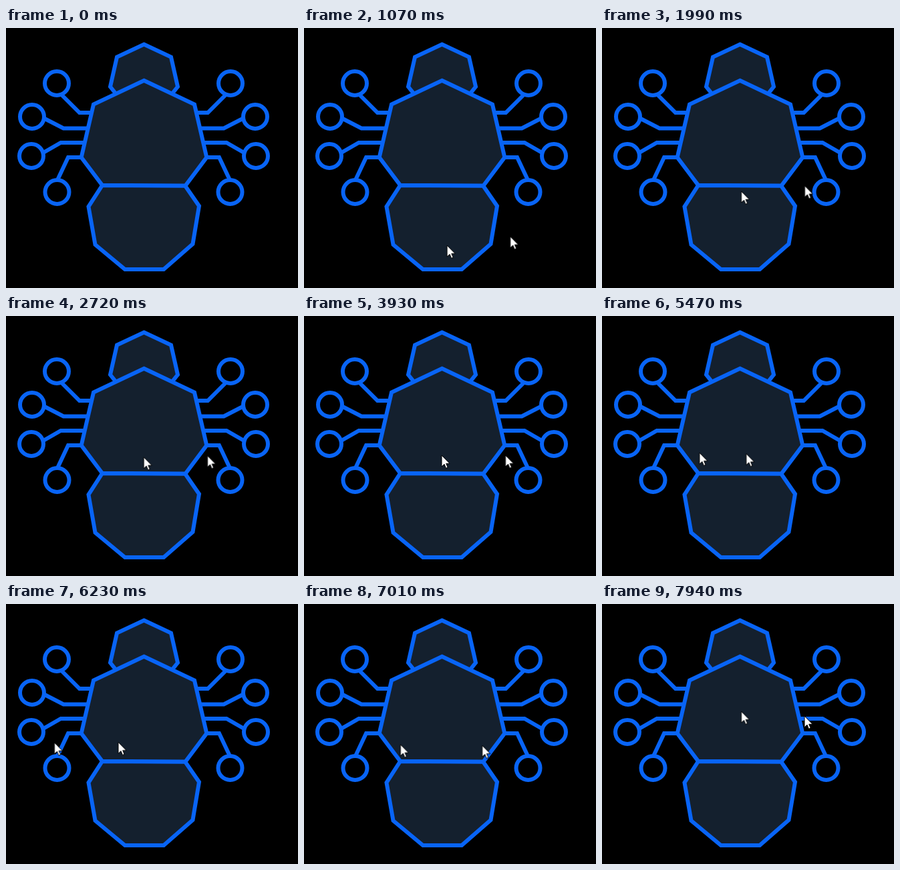
Animation of 437x390 px, one loop 8 s. Source, as an HTML page:

```html
<!DOCTYPE html>
<html lang="en">
<head>
<meta charset="utf-8">
<title>Bug with two pointers</title>
<style>
  html, body { margin: 0; width: 100%; height: 100%; overflow: hidden; background: #000; }
  svg { display: block; width: 100%; height: 100%; }
  .line { fill: none; stroke: #0864f6; stroke-width: 6; }
  .shell { fill: #14202e; stroke: #0864f6; stroke-width: 6; }
  .pointer {
    fill: #fff; stroke: #000;
    animation: roam 8s cubic-bezier(.333, 0, .667, 1) infinite;
  }
  /* The follower repeats the leader's path a moment later, further left. */
  .follower { animation-delay: 130ms; }
  .pointers { animation: appear 8s step-end infinite; }

  @keyframes appear {
    0% { visibility: hidden; }
    6.25%, 100% { visibility: visible; }
  }
  @keyframes roam {
    0%, 4.625% { transform: translate(314px, 390px); animation-timing-function: cubic-bezier(.33, .52, .67, .98); }
    35%, 49.125% { transform: translate(301.5px, 209px); }
    64% { transform: translate(264px, 204px); }
    72.75% { transform: translate(168px, 209px); }
    79.45% { transform: translate(168px, 207px); }
    93.075% { transform: translate(320px, 215px); }
    97.5% { transform: translate(304px, 161px); }
    99.2%, 100% { transform: translate(303px, 168px); }
  }
</style>
</head>
<body>
<svg viewBox="0 0 437 390">
  <defs>
    <g id="legs">
      <path d="M282 127H302L329 100M288 150.500H326L355 135.500M292 172H330L357 187.500M298 194H319L335 228"/>
      <circle cx="336" cy="83" r="18"/>
      <circle cx="373" cy="133" r="18"/>
      <circle cx="374" cy="192" r="18"/>
      <circle cx="335.500" cy="246" r="18"/>
    </g>
    <path id="arrow" d="M0 0V17L4 13.300L6.500 19.300L9.200 18.200L6.700 12.300H12Z"/>
  </defs>
  <g class="line">
    <use href="#legs"/>
    <use href="#legs" transform="translate(412) scale(-1 1)"/>
  </g>
  <g class="shell">
    <path d="M206.500 24.500L247 43.500L257 88L229 123H184L156 88L166 43.500Z"/>
    <path d="M144 236L123.500 268L133.500 325L178 362H236L279.500 324L289 267L268 236.500Z"/>
    <path d="M206.500 78.700L282 114.500L300.300 194L268.500 236.500L144 235.700L112.700 194L131 114.500Z"/>
  </g>
  <g class="pointers">
    <g transform="translate(-95.5)"><use href="#arrow" class="pointer follower"/></g>
    <use href="#arrow" class="pointer"/>
  </g>
</svg>
</body>
</html>
```
